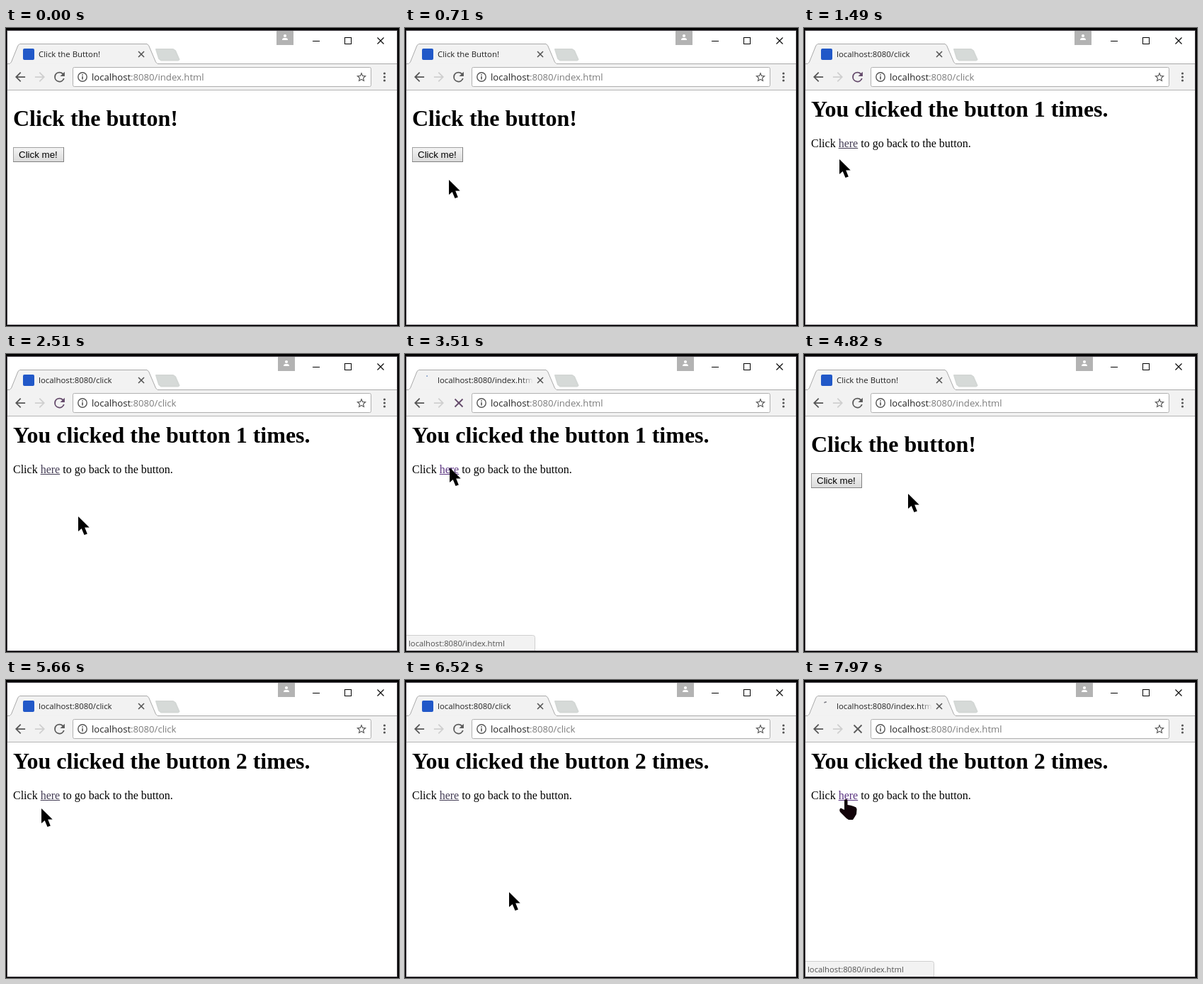
Write an HTML page with a canvas that moves like this. It is 555 px wide and 420 px high and loops after 8000 ms.

```html
<!DOCTYPE html>
<html lang="en">
<head>
<meta charset="utf-8">
<title>Click the Button!</title>
<style>
  html, body { margin: 0; width: 100%; height: 100%; overflow: hidden; background: #000; }
  canvas { display: block; }
</style>
</head>
<body>
<canvas id="stage" width="555" height="420"></canvas>
<script>
const ctx = document.getElementById('stage').getContext('2d');
const LOOP = 8000, STEP = 77;
const UI = '"Open Sans", "Noto Sans", sans-serif';
const SERIF = '"Liberation Serif", serif';
const SANS = '"Liberation Sans", sans-serif';

const linear = p => p;
const easeIn = p => p * (0.5 + 0.5 * p);
const easeOut = p => 1 - (1 - p) ** 2;
const smooth = p => p * p * (3 - 2 * p);

// Pointer moves: start time, number of steps, end x, end y, easing
const moves = [
  [240, 7, 62, 214, easeIn], [780, 2, 50, 185, easeOut],
  [2040, 3, 104, 238, smooth],
  [2510, 1, 102, 229, linear], [2590, 9, 63, 163, smooth],
  [3430, 1, 63, 160, linear],
  [3750, 11, 203, 248, smooth],
  [4590, 4, 147, 197, easeIn], [4900, 7, 50, 181, easeOut],
  [5750, 7, 110, 296, smooth],
  [6270, 3, 145, 303, easeOut], [6520, 1, 147, 299, linear],
  [6820, 11, 56, 167, smooth],
];

const backArrow = new Path2D('M20 11H7.83l5.59-5.59L12 4l-8 8 8 8 1.41-1.41L7.83 13H20z');
const reload = new Path2D('M17.65 6.35A7.96 7.96 0 0 0 12 4 8 8 0 1 0 19.73 14h-2.08A6 6 0 1 1 12 6c1.66 0 3.14.69 4.22 1.78L13 11h7V4z');
const star = new Path2D('M22 9.24l-7.19-.62L12 2 9.19 8.63 2 9.24l5.46 4.73L5.82 21 12 17.27 18.18 21l-1.63-7.03zM12 15.4l-3.76 2.27 1-4.28-3.32-2.88 4.38-.38L12 6.1l1.71 4.04 4.38.38-3.32 2.88 1 4.28z');
const arrow = new Path2D('M0 0V21L4.7 17 8.5 26 12.8 24.5 9.2 15.5H15.7Z');
const hand = new Path2D('M1 3Q1 1 3.2 1T5.5 3V9L10 9.7 14 11 17.5 12.5 18.6 15 18 22 15 27 13 30H7L4 28 -5 19Q-7 15 -4 13.5L-1 15 1 16Z');

const within = (t, a, b) => t >= a && t < b;
const inside = ([x, y], l, top, r, b) => x >= l && x <= r && y >= top && y <= b;

function pointerAt(t) {
  let x = 95, y = 395;
  for (const [start, steps, toX, toY, ease] of moves) {
    if (t < start) break;
    const done = Math.min(steps, 1 + Math.floor((t - start) / STEP + 0.1));
    const p = ease(done / steps);
    x += (toX - x) * p;
    y += (toY - y) * p;
  }
  return [Math.round(x), Math.round(y)];
}

function rect(x, y, w, h, color) {
  ctx.fillStyle = color;
  ctx.fillRect(x, y, w, h);
}

function outline(x, y, w, h, color) {
  ctx.strokeStyle = color;
  ctx.lineWidth = 1;
  ctx.strokeRect(x + 0.5, y + 0.5, w - 1, h - 1);
}

function text(str, x, y, font, color) {
  ctx.font = font;
  ctx.fillStyle = color;
  ctx.fillText(str, x, y);
  return x + ctx.measureText(str).width;
}

function line(points, color, width = 1, fill = null, close = false) {
  ctx.beginPath();
  points.forEach(([x, y]) => ctx.lineTo(x, y));
  if (close) ctx.closePath();
  if (fill) { ctx.fillStyle = fill; ctx.fill(); }
  ctx.strokeStyle = color;
  ctx.lineWidth = width;
  ctx.stroke();
}

function circle(x, y, r, color, stroke = 0) {
  ctx.beginPath();
  ctx.arc(x, y, r, 0, 7);
  ctx.fillStyle = ctx.strokeStyle = color;
  ctx.lineWidth = stroke;
  stroke ? ctx.stroke() : ctx.fill();
}

function rounded(x, y, w, h, r, fill, stroke) {
  ctx.beginPath();
  ctx.roundRect(x, y, w, h, r);
  ctx.fillStyle = fill;
  ctx.fill();
  if (!stroke) return;
  ctx.strokeStyle = stroke;
  ctx.lineWidth = 1;
  ctx.stroke();
}

function shape(path, x, y, color, sx = 1, sy = sx) {
  ctx.save();
  ctx.translate(x, y);
  ctx.scale(sx, sy);
  ctx.fillStyle = color;
  ctx.fill(path);
  ctx.restore();
}

function cross(x, y, size, color, width) {
  line([[x, y], [x + size, y + size]], color, width);
  line([[x + size, y], [x, y + size]], color, width);
}

function drawWindow(badgeX) {
  rect(0, 0, 555, 420, '#000');
  rect(2, 4, 550, 414, '#fff');
  rect(badgeX, 4, 24, 20, '#b3b3b3');
  circle(badgeX + 12, 11, 2.1, '#fff');
  rounded(badgeX + 8, 14, 8, 3, [3, 3, 0, 0], '#fff');
  line([[433, 18.5], [443, 18.5]], '#000');
  outline(478, 13, 10, 10, '#000');
  cross(524.5, 13.5, 9, '#000', 1.1);
}

function drawTab(s) {
  rect(2, 50, 550, 37, '#f2f2f2');
  rect(2, 87, 550, 1, '#b4b4b4');
  line([[2, 50.5], [5, 50.5], [7.5, 48], [17, 24.5], [19.5, 22.5], [199, 22.5],
    [201.5, 24.5], [211.5, 48], [214, 50.5], [552, 50.5]], '#a9a9a9', 1, '#f2f2f2');
  ctx.lineJoin = 'round';
  line([[212, 30], [236, 30], [239, 32], [244.5, 44.5], [243, 45.5], [219, 45.5], [216, 43]],
    '#d3d7d5', 2, '#d6dad8', true);
  ctx.lineJoin = 'miter';

  if (s.loading) {
    const sweep = s.t > 7950 ? 0.6 : 0.25;
    ctx.beginPath();
    ctx.arc(32, 37, 6, -1.6 - sweep, -1.6);
    ctx.strokeStyle = s.visit === 1 ? '#5c80bb' : '#77777f';
    ctx.lineWidth = 1.5;
    ctx.stroke();
  } else {
    rounded(24, 29, 16, 16, 2, '#2158c8');
  }
  text(s.title, 46, 41, '11.4px ' + UI, '#222');
  const fade = ctx.createLinearGradient(164, 0, 181, 0);
  fade.addColorStop(0, '#f2f2f200');
  fade.addColorStop(1, '#f2f2f2');
  rect(164, 28, 24, 18, fade);
  cross(187, 33, 8, '#555', 1.6);
}

function drawToolbar(s) {
  const ink = s.visit === 1 ? '#644a6b' : '#5a5a5a';
  shape(backArrow, 9.5, 58.5, '#555', 0.88);
  shape(backArrow, 58.5, 58.5, '#cfcfcf', -0.88, 0.88);
  if (s.loading) cross(70.5, 63.5, 11, ink, 1.8);
  else shape(reload, 64.5, 58, ink, 0.92);

  rounded(94.5, 55.5, 421, 27, 2, '#fff', '#b0b0b0');
  circle(108, 69, 6.2, '#555', 1.4);
  rect(107.2, 68, 1.6, 4.5, '#555');
  rect(107.2, 65.3, 1.6, 1.6, '#555');
  const end = text('localhost', 121, 74, '13.15px ' + UI, '#222');
  text(':8080/' + s.file, end, 74, '13.15px ' + UI, '#7c7c7c');
  shape(star, 493.6, 60.9, '#555', 0.7);
  for (const y of [64, 69, 74]) circle(534.5, y, 1.6, '#555');
}

function drawButton(hover, pressed) {
  const shade = ctx.createLinearGradient(0, 168, 0, 189);
  shade.addColorStop(0, pressed ? '#d8d8d8' : hover ? '#fafafa' : '#f5f5f5');
  shade.addColorStop(1, pressed ? '#ececec' : hover ? '#e6e6e6' : '#dadada');
  rect(10, 168, 72, 21, shade);
  outline(10, 168, 72, 21, hover ? '#7c7c7c' : '#a0a0a0');
  rect(10, 188, 72, 1, '#808080');
  rect(81, 168, 1, 21, '#808080');
  text('Click me!', 18, 183, '13.33px ' + SANS, '#000');
}

function drawPage(s) {
  const h1 = 'bold 32px ' + SERIF, body = '16px ' + SERIF;
  if (!s.result) {
    text('Click the button!', 10, 138, h1, '#000');
    drawButton(inside(s.pointer, 10, 168, 82, 189), s.pressed);
    return;
  }
  text(`You clicked the button ${s.visit} times.`, 10, 125, h1, '#000');
  const color = s.loading ? '#5a3480' : '#443d55';
  const left = text('Click ', 10, 168, body, '#000');
  const right = text('here', left, 168, body, color);
  rect(left, 169, right - left, 1, color);
  text(' to go back to the button.', right, 168, body, '#000');
}

function drawStatus(t) {
  const full = within(t, 3430, 3580) || t >= 7820;
  const appearing = within(t, 3350, 3430) || within(t, 7740, 7820);
  const leaving = within(t, 3580, 3750);
  ctx.globalAlpha = full ? 1 : appearing ? 0.5 : leaving ? 0.12 : 0;
  rounded(1.5, 396.5, 182, 22, [0, 3, 0, 0], '#f2f2f2', '#d0d0d0');
  text('localhost:8080/index.html', 5, 412, '11.25px ' + UI, '#505050');
  ctx.globalAlpha = 1;
}

function draw(t) {
  const result = within(t, 1480, 3580) || t >= 5590;
  const loading = [[1400, 1480], [3510, 3580], [5520, 5590], [7890, LOOP]].some(([a, b]) => within(t, a, b));
  const file = result !== loading ? 'click' : 'index.html';
  const s = {
    t, result, loading, file,
    visit: result ? (t < 5000 ? 1 : 2) : 0,
    title: result || loading ? 'localhost:8080/' + file : 'Click the Button!',
    pressed: within(t, 1320, 1400) || within(t, 5440, 5520),
    pointer: pointerAt(t),
  };
  drawWindow(t < 1560 ? 382 : 384);
  drawTab(s);
  drawToolbar(s);
  drawPage(s);
  drawStatus(t);
  outline(1, 3, 552, 416, '#4a464c');
  if (t < 70) return;
  const overLink = result && inside(s.pointer, 48, 154, 76, 172) && !within(t, 3510, 3580);
  shape(overLink ? hand : arrow, ...s.pointer, overLink ? '#120309' : '#000');
}

const start = performance.now();
function tick() {
  draw((performance.now() - start) % LOOP);
  requestAnimationFrame(tick);
}
tick();
</script>
</body>
</html>
```
